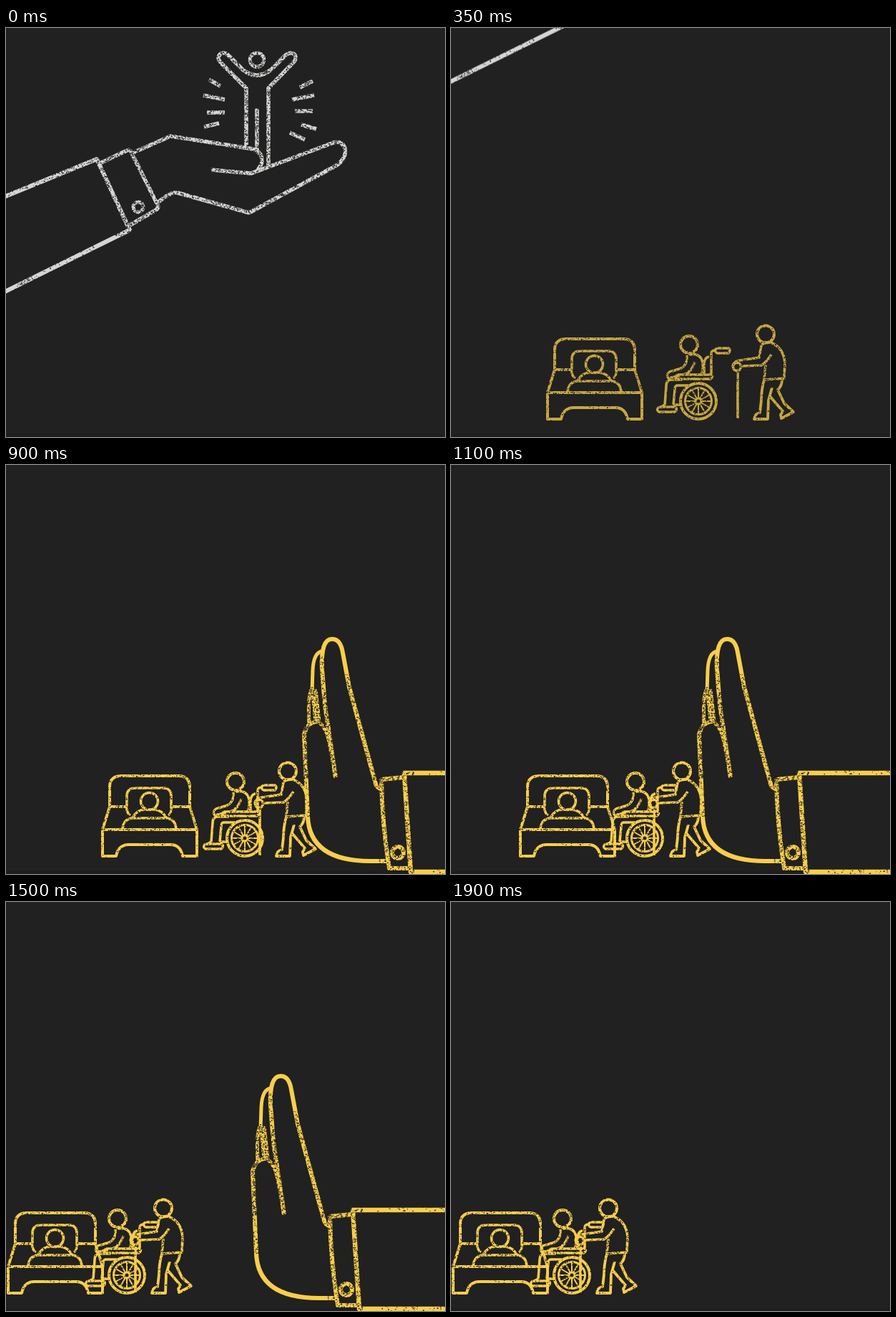
An HTML page with a canvas for the animation above (1950 ms loop, 614 by 571 pixels).

```html
<!DOCTYPE html>
<html lang="en">
<head>
<meta charset="utf-8">
<title>Pushing hand</title>
<style>
html, body { margin: 0; width: 100%; height: 100%; overflow: hidden; background: #212121; }
canvas { display: block; }
</style>
</head>
<body>
<canvas id="stage" width="614" height="571"></canvas>
<script>
const LOOP = 1950, STEP = 50, PAD = 40;
const WHITE = '#d5d5d3', YELLOW = '#f8ce4b';
const ctx = document.getElementById('stage').getContext('2d');

let seed = 7;
const random = () => (seed = seed * 16807 % 2147483647) / 2147483647;

const ring = (x, y, r) => `M${x + r} ${y}a${r} ${r} 0 1 0 ${-2 * r} 0a${r} ${r} 0 1 0 ${2 * r} 0`;

// strokes: [line width, path]; worn: [x, y, width, height, specks per pixel]
function sprite(color, strokes, worn) {
  const c = document.createElement('canvas');
  c.width = 860;
  c.height = 571;
  const g = c.getContext('2d');
  g.translate(PAD, 0);
  g.strokeStyle = color;
  g.lineJoin = 'round';
  for (const [width, path] of strokes) {
    g.lineWidth = width;
    g.stroke(new Path2D(path));
  }
  g.globalCompositeOperation = 'destination-out';
  for (const [x, y, w, h, density] of worn) {
    for (let n = w * h * density; n > 0; n--) {
      g.fillRect(x + random() * w, y + random() * h, 0.6 + random() * 1.3, 0.6 + random() * 1.1);
    }
  }
  return c;
}

const giver = sprite(WHITE, [
  [5, ring(351, 44.5, 9.7)],
  [5.5, `M336 168V84L300 48C292 39 303 30 311 38L331 58Q351 74 371 58L391 38
    C400 30 410 39 403 47L367 84V192 M351 112V171`],
  [5.5, `M284 72L300 81M276 94L306 100M281 118H306M277 138L298 133
    M411 83L429 74M400 100L431 94M404 116H429M413 135L434 141M397 146L418 156`],
  [5.5, `M178 174L230 151L340 168Q358 171 358 185Q357 198 343 203L287 198
    M343 203L458 160C476 155 482 179 462 192L340 258L240 230Q231 228 212 244`],
  [5.5, 'M131 189L169 171Q173 169 175 173L212 247Q214 251 210 254L172 276'],
  [6, 'M-40 251L127 183L173 282L-40 387'],
  [5, ring(185, 250, 7)]
], [
  [126, 28, 360, 262, 0.22],
  [60, 180, 66, 40, 0.14],
  [-40, 180, 166, 210, 0.05],
  [15, 335, 30, 30, 0.12]
]);

const bed = sprite(YELLOW, [
  [4, `M145 478V450Q145 434 161 434H241Q257 434 257 450V478
    M169 477H145L135 509M231 477H257L267 509
    M135 509H267V546H247Q244 530 230 530H172Q157 530 154 546H135Z`],
  [3.5, `M174 489Q168 486 169 476V462Q169 451 181 451H220Q231 451 231 462V476Q232 486 227 489
    M163 508Q164 495 176 493H226Q237 495 238 508
    M177 492Q184 481 194 481H208Q218 482 224 492` + ring(200.5, 469.5, 12)]
], [[130, 428, 140, 82, 0.13], [130, 510, 140, 40, 0.04]]);

let spokes = '';
for (let i = 0; i < 12; i++) {
  const a = i * Math.PI / 6, dx = Math.cos(a), dy = Math.sin(a);
  spokes += `M${346 + 5 * dx} ${521 + 5 * dy}L${346 + 18 * dx} ${521 + 18 * dy}`;
}
const chair = sprite(YELLOW, [
  [4, ring(333, 442, 12) + ring(346, 521, 25)],
  [3.5, `M330 457Q331 470 322 475L306 480Q300 484 304 489L326 484Q337 480 341 466
    M333 456Q349 453 352 467Q353 476 350 484M354 482V467Q356 459 361 459
    M364 485V455Q364 450 369 450M372 447H388Q392 450 388 454H372Q367 450 372 447
    M317 484H363Q368 486 363 490H317Q312 487 317 484
    M324 491H307Q301 492 301 500L299 526M332 499H316Q313 500 313 505L311 526
    M299 526L292 530M311 526H321M291 529H313Q318 532 313 536H291Q286 533 291 529`],
  [3, ring(346, 521, 18.5) + ring(346, 521, 4)],
  [2, spokes]
], [[285, 428, 110, 64, 0.12], [285, 492, 110, 58, 0.06]]);

const walker = sprite(YELLOW, [
  [4, ring(440, 427.5, 12)],
  [3.6, `M434 443Q438 438 447 439Q465 446 467 467L466 489L438 491L440 470
    M434 443L431 460L404 464Q395 465 394 473M405 472L434 471Q440 468 448 456
    M401 478V545` + ring(400, 473, 5.5)],
  [3.8, `M438 491Q434 505 434 520L432 537Q424 539 424 546H443L444 520L449 502
    M463 490Q463 500 457 505L466 524L479 536L462 545L461 540L464 535L446 514`]
], [[390, 412, 95, 82, 0.13], [390, 494, 95, 56, 0.05]]);

const pusher = sprite(YELLOW, [
  [6, `M391 436L376 335L372 285Q370 243 386 243Q398 243 401 262L410 310L447 445Q449 451 455 452
    M366 358Q352 358 347 376L352 490Q354 553 440 553H466`],
  [5, `M372 260Q360 262 359 287L358 318M357 314Q352 325 354 360M363 313L368 358
    M359 318L363 358M366 358Q379 366 383 392L391 436`],
  [6, 'M486 436L455 439Q456 500 466 563H496'],
  [6.5, 'M800 430H487L496 568H800'],
  [6, ring(478, 541, 8)]
], [
  [345, 310, 55, 128, 0.28],
  [400, 290, 55, 160, 0.16],
  [366, 265, 14, 45, 0.15],
  [340, 360, 20, 130, 0.1],
  [450, 425, 50, 146, 0.16],
  [520, 425, 280, 146, 0.05]
]);

// Linear path through [time, value] points, held at both ends
function track(t, points) {
  let [t0, v0] = points[0];
  if (t <= t0) return v0;
  for (const [t1, v1] of points) {
    if (t < t1) return v0 + (v1 - v0) * (t - t0) / (t1 - t0);
    [t0, v0] = [t1, v1];
  }
  return v0;
}

const put = (image, x, y = 0) => ctx.drawImage(image, x - PAD, y);

function draw(now) {
  const t = Math.floor(now % LOOP / STEP) * STEP;
  ctx.globalAlpha = 1;
  ctx.fillStyle = '#212121';
  ctx.fillRect(0, 0, 614, 571);
  ctx.fillStyle = '#1f1d1e';
  ctx.fillRect(0, 567, 614, 4);

  if (t < 500) put(giver, -t / 50, -t * 124 / 150);

  ctx.globalAlpha = Math.min(1, t / 450);
  put(bed, track(t, [[1000, 0], [1100, -38], [1350, -132]]));
  put(chair, track(t, [[860, 0], [900, -12], [1100, -75], [1350, -177]]));
  put(walker, track(t, [[783, 0], [900, -46], [1100, -117], [1350, -220]]));
  ctx.globalAlpha = 1;
  if (t >= 350) {
    put(pusher, track(t, [[350, 287], [550, 208], [900, 70], [1100, 0], [1350, -104], [1500, -2], [1900, 273]]));
  }
  requestAnimationFrame(draw);
}
requestAnimationFrame(draw);
</script>
</body>
</html>
```
